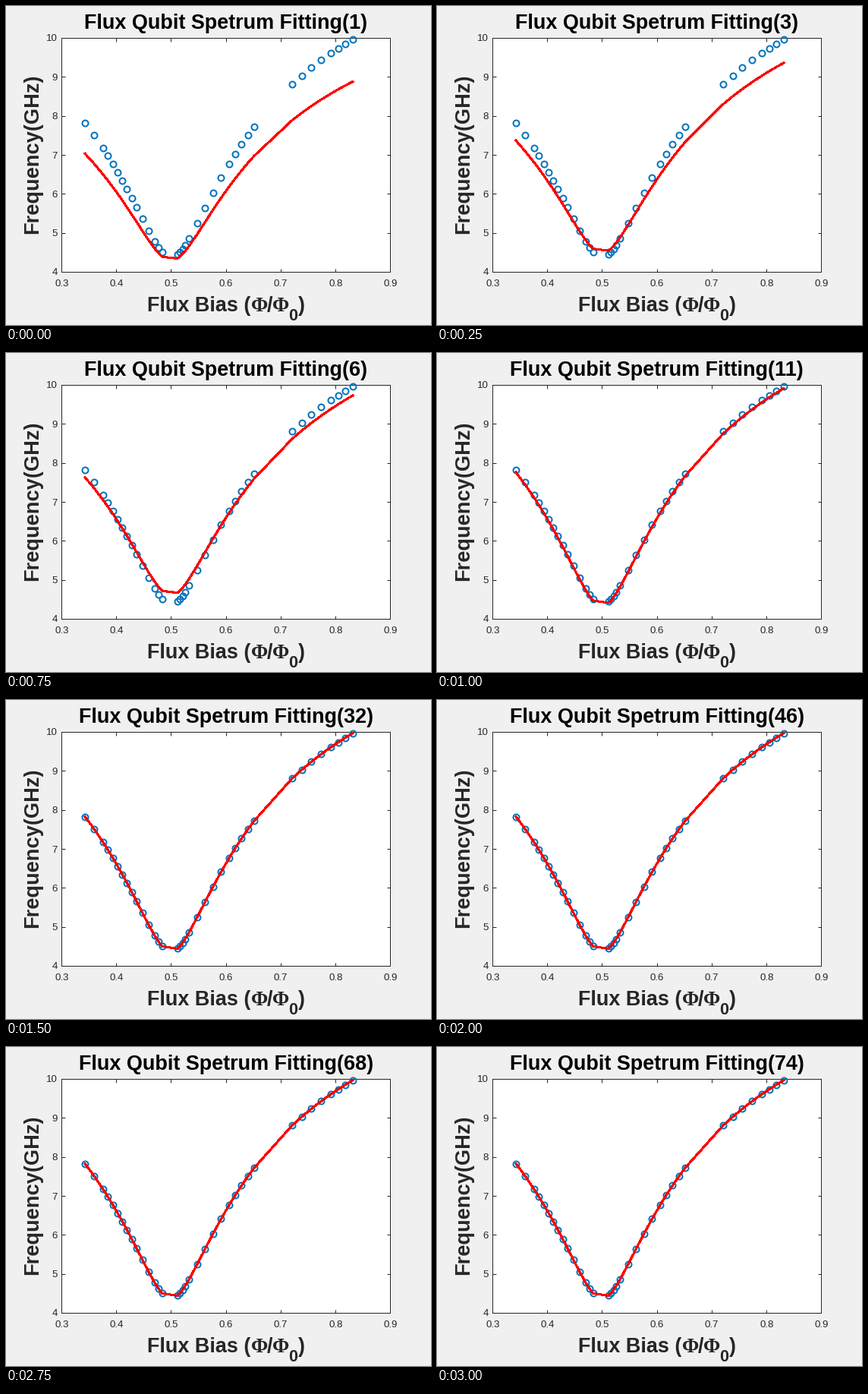
Write a matplotlib script that moves like this. It is 560x420 px and loops after 3.25 s.

```python
import numpy as np
import matplotlib.pyplot as plt
from matplotlib.animation import FuncAnimation

W, H, DPI = 560, 420, 72  # at 72 dpi one point is one pixel
INK, BLUE, RED = "#262626", "#0072BD", "#FF0000"
SANS, SERIF = "Liberation Sans", "Liberation Serif"
LABEL, TICK = 27.05, 13.2
LEFT, RIGHT, TOP, BOTTOM = 73, 506, 42, 350

COUNTS = [1, 3, 4, 6, 11, 24, 32, 39, 46, 53, 63, 68, 74]

# How the fit parameters settle with the iteration count
KNOTS = [1, 3, 4, 6, 11, 24]
GAP = [4.28, 4.48, 4.58, 4.60, 4.33, 4.36]
GAIN = [.751, .829, .865, .900, .995, 1.012]
TILT = [.02, .05, .06, .06, 0, -.02]


def spectrum(flux, gap, gain, tilt):
    """Avoided crossing whose arms flatten away from half flux."""
    x = flux - .5
    bias = x / (.0127 + .0735 * np.hypot(x, .02))
    return np.sqrt(gap**2 + (gain + tilt * x) * bias**2)


def params(count):
    return [np.interp(count, KNOTS, values) for values in (GAP, GAIN, TILT)]


# Sweep positions: evenly spaced runs between a few turning points
flux = np.interp(
    np.arange(37),
    [0, 2, 4, 9, 12, 14, 15, 18, 19, 20, 24, 28, 29, 33, 36],
    [.343, .376, .394, .437, .470, .484, .512, .526, .533, .548, .606,
     .652, .721, .792, .832])
freq = spectrum(flux, *params(COUNTS[-1]))

fig = plt.figure(figsize=(W / DPI, H / DPI), dpi=DPI, facecolor="#F0F0F0")
ax = fig.add_axes([LEFT / W, 1 - BOTTOM / H,
                   (RIGHT - LEFT) / W, (BOTTOM - TOP) / H])
ax.set(xlim=(.3, .9), ylim=(4, 10),
       xticks=np.arange(3, 10) / 10, yticks=range(4, 11))
ax.tick_params(direction="in", length=4.5, width=1, color=INK,
               top=True, right=True, labelbottom=False, labelleft=False)
for spine in ax.spines.values():
    spine.set(color=INK, linewidth=1)


def put(px, py, text, size=LABEL, weight="bold", family=SANS, color=INK,
        ha="left", **kw):
    return fig.text(px / W, 1 - py / H, text, size=size, weight=weight,
                    family=family, color=color, ha=ha, va="baseline", **kw)


for i in range(7):
    put(LEFT + .5 + i * (RIGHT - LEFT) / 6, 369, f"0.{i + 3}", TICK,
        "normal", ha="center")
    put(68, BOTTOM + 4.5 - i * (BOTTOM - TOP) / 6, str(i + 4), TICK,
        "normal", ha="right")

title = put(289.7, 30, "", color="black", ha="center")
put(42.5, 194.7, "Frequency(GHz)", size=27.3, ha="center", rotation=90,
    rotation_mode="anchor")
put(186, 402, "Flux Bias (")
put(344, 402, "/")
put(372.5, 414, "0", size=21.6)
put(385, 402, ")")
for px in (323.5, 351.5):
    put(px, 402, "Φ", family=SERIF)

ax.plot(flux, freq, "o", ms=8, mew=2, mec=BLUE, mfc="none",
        antialiased=False, clip_on=False, zorder=4)
fit, = ax.plot([], [], color=RED, lw=2, antialiased=False, zorder=5)


def draw(i):
    count = COUNTS[i]
    title.set_text(f"Flux Qubit Spetrum Fitting({count})")
    fit.set_data(flux, spectrum(flux, *params(count)))
    return title, fit


anim = FuncAnimation(fig, draw, frames=len(COUNTS), interval=250,
                     repeat=True, repeat_delay=0, blit=False)
plt.show()
```
